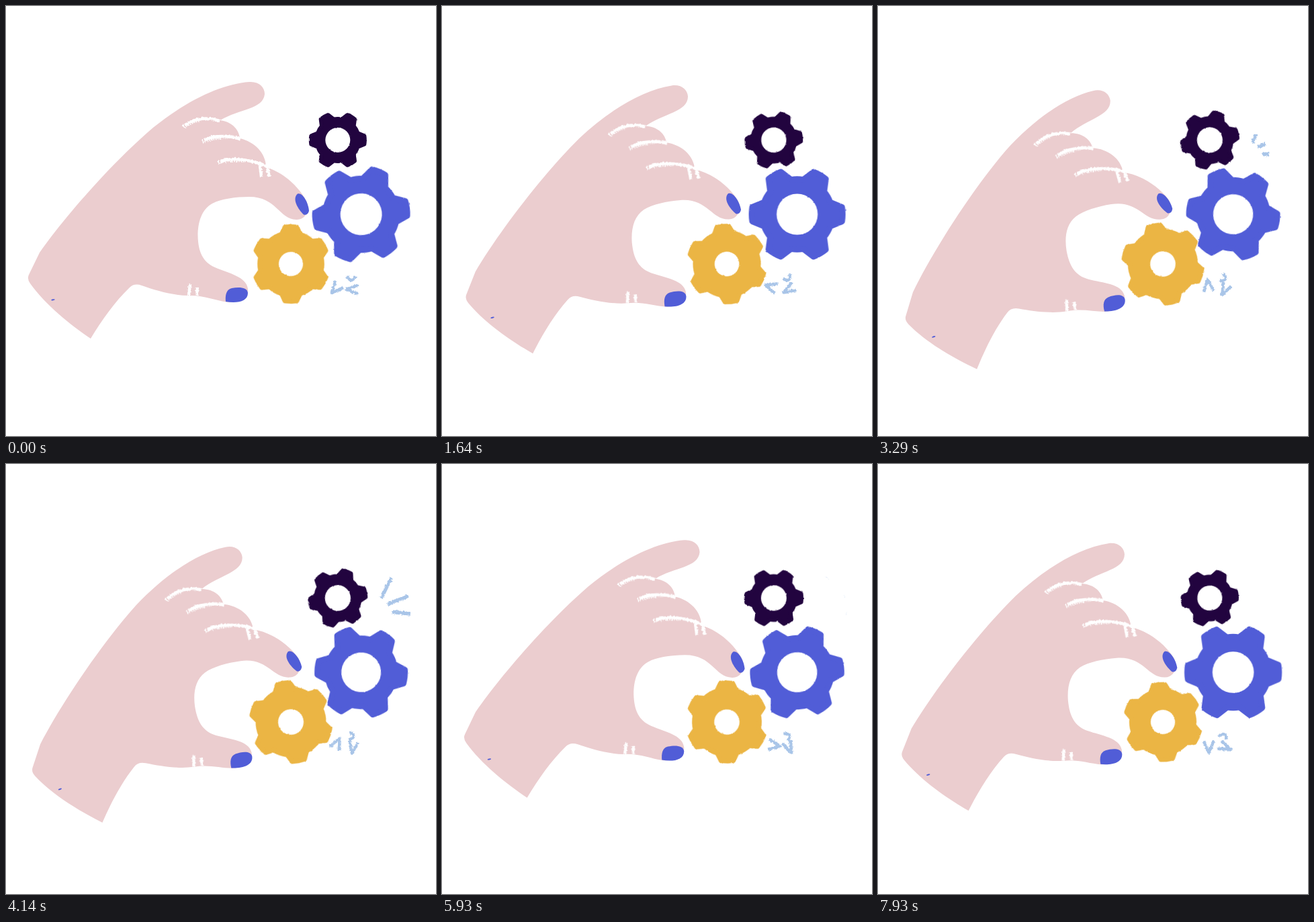
An HTML page that plays this animation: 640x640 px, repeating every 8000 ms.

```html
<!DOCTYPE html>
<html lang="en">
<head>
<meta charset="utf-8">
<title>Hand turning gears</title>
<style>
  html, body { margin: 0; height: 100%; overflow: hidden; background: #fff; }
  svg { display: block; width: 100vw; height: 100vh; }
  .chalk { fill: none; stroke-linejoin: round; }
  .white { stroke: #fff; stroke-width: 4.5; }
  .fray { stroke-width: 6; stroke-dasharray: 1.6 1.8; }
  .sky { stroke: #a9c5e8; stroke-width: 4.6; }
  #rays { stroke-width: 5.4; }
</style>
</head>
<body>
<svg viewBox="0 0 640 640">
  <defs>
    <!-- The colour matrix makes the noise opaque. -->
    <filter id="rough" x="-20%" y="-20%" width="140%" height="140%" color-interpolation-filters="sRGB">
      <feTurbulence type="fractalNoise" baseFrequency=".25" numOctaves="2" seed="4"/>
      <feColorMatrix values="1 0 0 0 0  0 1 0 0 0  0 0 1 0 0  0 0 0 0 1" result="noise"/>
      <feDisplacementMap in="SourceGraphic" in2="noise" scale="2" xChannelSelector="R" yChannelSelector="G"/>
    </filter>
    <filter id="brush" x="-20%" y="-20%" width="140%" height="140%" color-interpolation-filters="sRGB">
      <feTurbulence type="fractalNoise" baseFrequency=".35" numOctaves="2" seed="9"/>
      <feColorMatrix values="1 0 0 0 0  0 1 0 0 0  0 0 1 0 0  0 0 0 0 1" result="noise"/>
      <feDisplacementMap in="SourceGraphic" in2="noise" scale="4" xChannelSelector="R" yChannelSelector="G"/>
    </filter>
  </defs>

  <g id="gears"></g>

  <g id="hand">
    <path fill="#ebcdcf" d="M126 495 C95 474 58 444 36 413 Q31 406 34 400 L50 367
      C87 314 158 233 219 181 C267 142 320 116 362 113 C377 112 385 121 385 131
      C383 154 347 153 319 170 C338 173 347 185 348 197 C370 202 387 219 387 240
      C412 247 436 269 447 290 C453 303 446 319 432 318 C406 317 403 284 362 284
      C342 284 320 287 307 294 C291 303 285.5 322 285.5 342 C286 366 293 381 311 389
      C332 398 358 403 360 421 C361 435 345 442 328 440.500 C311 438 293 430 272 431
      C248 431 222 423 202 416 Q191 412 184 419 C162 440 143 467 126 495 Z"/>
    <g fill="#515dd7">
      <path d="M434 279.500 C441 277 450 292 451 305 Q449 312 443 310.500 C435 303 425 287 434 279.500 Z"/>
      <path d="M327 440 C326 430 328 422 336 420 C346 418 359 418 360 427 C360 440 344 443 327 440 Z"/>
      <ellipse cx="70" cy="437.300" rx="2.800" ry="1" transform="rotate(-10 70 437)"/>
    </g>
    <g class="chalk white" filter="url(#brush)">
      <path d="M268 177 C280 167 300 165 318 171"/>
      <path d="M296 199 C310 192 332 193 349 198"/>
      <path d="M320 231 C342 224 368 230 392 240"/>
      <g class="fray">
        <path d="M264 180 Q275 171 290 170"/>
        <path d="M292 201 Q305 196 322 196"/>
        <path d="M316 233 Q332 228 354 230"/>
      </g>
      <path d="M378 237 L380 254 M388 238 L392 254"/>
      <path d="M274 414 L272 431 M284 419 L285 431"/>
    </g>
  </g>

  <g class="chalk sky" filter="url(#brush)">
    <path id="leftMark" d="M-6 -8 L11 0 L-6 7"/>
    <path id="rightMark" d="M-8 -7 L9 0 L-9 6"/>
    <path id="topMark" d="M-3 -6 Q9 0 -3 6"/>
  </g>
  <g id="rays" class="chalk sky" filter="url(#brush)">
    <path pathLength="1" d="M557 203 L573.500 169"/>
    <path pathLength="1" d="M565 210 L599 196.500"/>
    <path pathLength="1" d="M572 220 L602 223"/>
  </g>
</svg>
<script>
const LOOP = 8000, SWING = 3167;
const byId = id => document.getElementById(id);

function gearPath(tipRadius, baseRadius, tipHalf, baseHalf) {
  const point = (radius, degrees) => {
    const a = degrees * Math.PI / 180;
    return `${(radius * Math.cos(a)).toFixed(2)} ${(radius * Math.sin(a)).toFixed(2)}`;
  };
  let d = `M${point(baseRadius, -baseHalf)}`;
  for (let a = 0; a < 360; a += 60) {
    d += `L${point(tipRadius, a - tipHalf)}`
       + `A${tipRadius} ${tipRadius} 0 0 1 ${point(tipRadius, a + tipHalf)}`
       + `L${point(baseRadius, a + baseHalf)}`
       + `A${baseRadius} ${baseRadius} 0 0 1 ${point(baseRadius, a + 60 - baseHalf)}`;
  }
  return d + 'Z';
}

// The outline stroke rounds the tooth corners.
const gears = [
  { x: 493.8, y: 199.5, color: '#22043f', path: gearPath(40, 31.5, 9, 19), edge: 6, hole: 18.5, from: 0, turn: -12.8, grow: .035 },
  { x: 528.6, y: 310, color: '#515dd7', path: gearPath(68.5, 53, 9, 20), edge: 9, hole: 31, from: -7.4, turn: 15.6, grow: -.048 },
  { x: 424, y: 384, color: '#ebb544', path: gearPath(55.7, 46.3, 9, 17.5), edge: 7, hole: 18, from: 30, turn: -13.2, grow: .055 }
];
byId('gears').innerHTML = gears.map(g =>
  `<g filter="url(#rough)"><path d="${g.path}" fill="${g.color}" stroke="${g.color}"
    stroke-width="${g.edge}" stroke-linejoin="round"/><circle r="${g.hole}" fill="#fff"/></g>`).join('');
gears.forEach((g, i) => g.node = byId('gears').children[i]);

const smooth = (t, start, end) => {
  const x = Math.min(1, Math.max(0, (t - start) / (end - start)));
  return x * x * (3 - 2 * x);
};

// Eased swing 0 -> 1 -> 0 with a brief rest at each end.
function swing(t, start, half) {
  const phase = Math.abs(t - start) / half % 2;
  return smooth(1 - Math.abs(1 - phase), .055, .945);
}

const place = (id, x, y, angle) =>
  byId(id).setAttribute('transform', `translate(${x} ${y}) rotate(${angle})`);

function draw(t) {
  const turn = swing(t, 100, SWING), pulse = swing(t, 0, 4500);
  for (const g of gears) {
    g.node.setAttribute('transform',
      `translate(${g.x} ${g.y}) rotate(${g.from + g.turn * turn}) scale(${1 + g.grow * pulse})`);
  }
  byId('hand').setAttribute('transform', `rotate(${-9.05 * turn} 424 384)`);

  place('leftMark', 492, 418.5, 130 + .04 * t);
  place('rightMark', 516, 421.5, 180 - .02 * t);
  place('topMark', 514, 405, 90 - .02 * t);

  const head = smooth(t, 2700, 4200), tail = smooth(t, 3700, 6050);
  byId('rays').style.visibility = head > tail ? 'visible' : 'hidden';
  for (const ray of byId('rays').children) {
    ray.setAttribute('stroke-dasharray', `${head - tail} 3`);
    ray.setAttribute('stroke-dashoffset', -tail);
  }
}

const began = performance.now();
function frame() {
  draw((performance.now() - began) % LOOP);
  requestAnimationFrame(frame);
}
frame();
</script>
</body>
</html>
```
